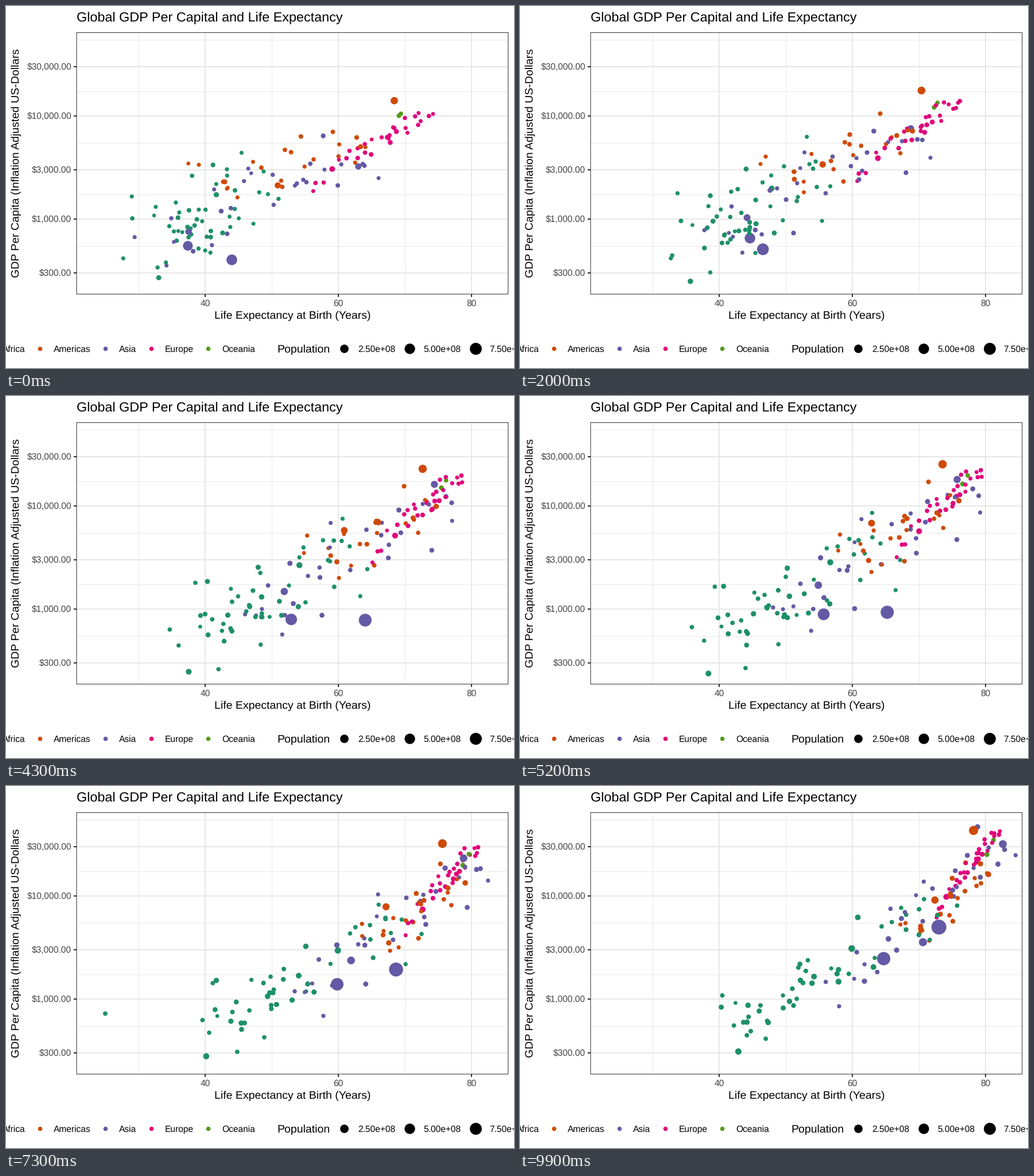
A matplotlib script that plays this animation: 885x632 px, repeating every 10000 ms.

```python
import numpy as np
import matplotlib.pyplot as plt
from matplotlib.animation import FuncAnimation
from matplotlib.patches import Rectangle

W, H, DPI = 885, 632, 100
FRAMES, INTERVAL = 100, 100
PT = 72 / DPI  # points per pixel
LEFT, TOP, RIGHT, BOTTOM = 123, 46.4, 874.8, 503
YEARS = np.arange(1952, 2008, 5)
T = np.linspace(0, 1, len(YEARS))
COLOR = {"Africa": "#1e9069", "Americas": "#d04a07", "Asia": "#6459a4",
         "Europe": "#e1007a", "Oceania": "#559a17"}
GROWTH = {"Africa": 3.7, "Americas": 2.2, "Asia": 2.55, "Europe": 1.25,
          "Oceania": 2.2}

# (life, log gdp) of the poorest and richest member, first and last year;
# skew bends the ranks between them, spread scatters the members
CLOUDS = {
    "Africa": dict(n=50, first=[(34, 2.75), (47, 3.4)],
                   last=[(42, 2.7), (75, 4.0)], skew=1.5, spread=.24),
    "Americas": dict(n=23, first=[(40, 3.3), (64, 3.75)],
                     last=[(69, 3.55), (80, 4.3)], skew=1, spread=.12),
    "Asia": dict(n=28, first=[(32, 2.75), (62, 3.6)],
                 last=[(57, 3.05), (82, 4.55)], skew=.8, spread=.2),
    "Europe": dict(n=30, first=[(56, 3.3), (72.5, 4.05)],
                   last=[(72.5, 3.8), (81.3, 4.65)], skew=.67, spread=.06),
    "Oceania": dict(n=2, first=[(69.1, 4.0), (69.4, 4.02)],
                    last=[(80.2, 4.4), (81.2, 4.54)], skew=1, spread=0),
}

# continent, first population in millions, turning points (year, life, gdp)
LARGE = [
    ("Asia", 540, (1952, 44, 400), (1962, 44.5, 488), (1972, 63.1, 677),
     (1982, 65.5, 962), (2007, 73, 4959)),
    ("Asia", 400, (1952, 37.4, 547), (1980, 55.6, 840), (2007, 64.7, 2452)),
    ("Asia", 75, (1952, 63, 3217), (1972, 73.4, 14800), (2007, 82.6, 31656)),
    ("Asia", 85, (1952, 37.5, 750), (2007, 70.6, 3540)),
    ("Americas", 150, (1952, 68.4, 13990), (2007, 78.2, 42950)),
    ("Americas", 68, (1952, 50.9, 2109), (1980, 62.6, 6850),
     (2007, 72.4, 9066)),
    ("Africa", 2.5, (1952, 40, 493), (1987, 44, 848), (1992, 23.6, 737),
     (1997, 36.1, 590), (2007, 46.2, 863)),
]


def cloud(rng, n, first, last, skew, spread):
    """Members rise from their first to their last rank with a bend midway."""
    rank = np.linspace(0, 1, n)[:, None] ** skew

    def path(axis, ease, scale):
        (a, b), (c, d) = (np.array(ends)[:, axis] for ends in (first, last))
        start, end = a + (b - a) * rank, c + (d - c) * rank
        off, bend = scale * np.clip(rng.normal(size=(2, n, 1)), -1.8, 1.8)
        jitter = .1 * scale * rng.normal(size=(n, len(T)))
        return (start + (end - start) * ease + off * (1 - .4 * T)
                + .6 * bend * np.sin(np.pi * T) + jitter)

    return path(0, 1 - (1 - T) ** 1.5, 18 * spread), path(1, T, spread)


def build(rng):
    """Life, log gdp and population per country and five-year step."""
    rows = []

    def add(name, pop, life, gdp):
        rows.append((name, life, gdp, pop * (1 + (GROWTH[name] - 1) * T)))

    for name, pop, *points in LARGE:
        year, life, gdp = zip(*points)
        add(name, pop, np.interp(YEARS, year, life),
            np.interp(YEARS, year, np.log10(gdp)))
    for name, rule in CLOUDS.items():
        for life, gdp in zip(*cloud(rng, **rule)):
            add(name, 4 * np.exp(rng.normal()), life, gdp)
    rows = [rows[i] for i in rng.permutation(len(rows))]
    names, *series = zip(*rows)
    return names, np.array(series)


def px(life):
    return 347 + (life - 40) * 11.6


def py(log_gdp):
    return 371.5 - 180 * (log_gdp - 3)


def dot(radius):
    """Marker area for a radius in pixels."""
    return (2 * radius * PT) ** 2


def area(pop):
    return dot(3.2 + 9.6 * np.sqrt(pop / 1320))


plt.rcParams.update({"font.family": "Liberation Sans",
                     "text.hinting": "none"})
fig = plt.figure(figsize=(W / DPI, H / DPI), dpi=DPI, facecolor="white")
ax = fig.add_axes([0, 0, 1, 1])
ax.set(xlim=(0, W), ylim=(H, 0))
ax.axis("off")


def line(xs, ys, width, color):
    ax.plot(xs, ys, color=color, lw=width * PT, solid_capstyle="butt",
            zorder=1)


def label(x, y, text, size=11.2, color="black", **kw):
    ax.text(x, y, text, fontsize=size, color=color, va="baseline", **kw)


GRID, DARK, GREY = "#e7e7e7", "#2a2a2a", "#444444"
for life in (30, 50, 70):
    line([px(life)] * 2, [TOP, BOTTOM], 1, GRID)
for k in range(5):
    line([LEFT, RIGHT], [58.5 + 90 * k] * 2, 1, GRID)
for life in (40, 60, 80):
    x = px(life)
    line([x, x], [TOP, BOTTOM], 2, GRID)
    line([x, x], [BOTTOM, BOTTOM + 5], 2, DARK)
    label(x, 523.8, str(life), color=GREY, ha="center")
for gdp in (300, 1000, 3000, 10000, 30000):
    y = py(np.log10(gdp))
    line([LEFT, RIGHT], [y, y], 2, GRID)
    line([LEFT - 5, LEFT], [y, y], 2, DARK)
    label(114, y + 5.7, f"\\${gdp:,.2f}", color=GREY, ha="right")
ax.add_patch(Rectangle((LEFT, TOP), RIGHT - LEFT, BOTTOM - TOP, fill=False,
                       ec=DARK, lw=PT, zorder=4, snap=False))

label(123, 27, "Global GDP Per Capital and Life Expectancy", 16.8)
label(499, 546, "Life Expectancy at Birth (Years)", 14, ha="center")
label(23.5, 274.5, "GDP Per Capita (Inflation Adjusted US-Dollars", 14,
      ha="center", rotation=90, rotation_mode="anchor")

label(33.5, 603.8, "Africa", ha="right")
for x, name in ((58.5, "Americas"), (172.5, "Asia"), (252.5, "Europe"),
                (351.5, "Oceania")):
    ax.scatter(x, 598, s=dot(3.8), c=COLOR[name], lw=0)
    label(x + 24.5, 603.8, name)
label(472, 605, "Population", 14)
for x, pop in ((588.5, 250), (703, 500), (817.5, 750)):
    ax.scatter(x, 598, s=area(pop), c="black", lw=0)
    label(x + 24.5, 603.8, f"{pop * 1e6:.2e}")

names, series = build(np.random.default_rng(12))
points = ax.scatter(np.zeros(len(names)), np.zeros(len(names)), s=1,
                    c=[COLOR[n] for n in names], lw=0, zorder=3)


def update(i):
    step = i / (FRAMES - 1) * (len(YEARS) - 1)
    k = min(int(step), len(YEARS) - 2)
    now, after = series[:, :, k], series[:, :, k + 1]
    life, gdp, pop = now + (after - now) * (step - k)
    points.set_offsets(np.column_stack([px(life), py(gdp)]))
    points.set_sizes(area(pop))
    return points,


anim = FuncAnimation(fig, update, frames=FRAMES, interval=INTERVAL,
                     repeat=True, repeat_delay=0, blit=False)
plt.show()
```
